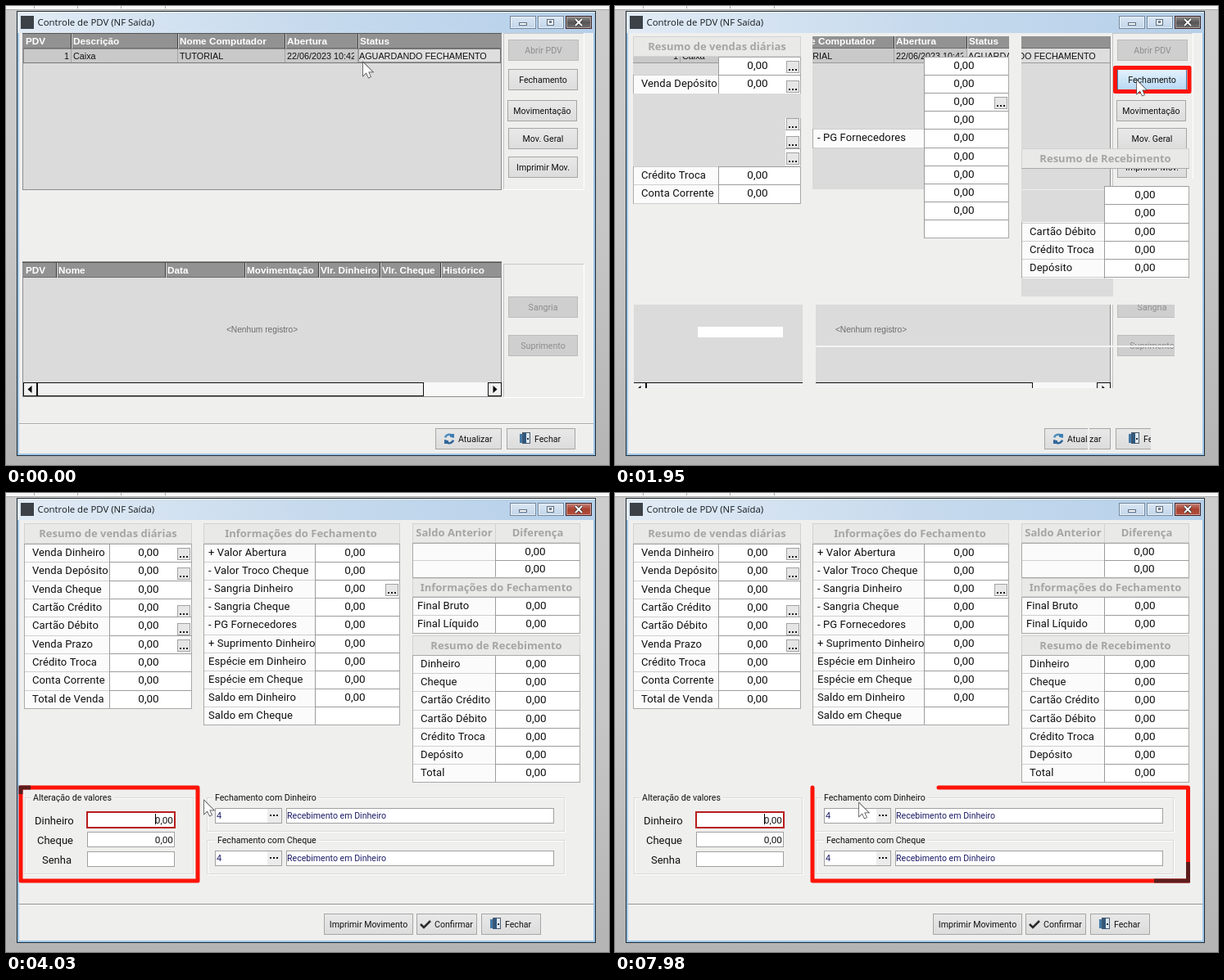
Write an HTML page with a canvas that moves like this. It is 736 by 561 pixels and loops after 8 s.

```html
<!DOCTYPE html>
<html lang="pt">
<head>
<meta charset="utf-8">
<title>Controle de PDV</title>
<style>
html, body { margin: 0; width: 100%; height: 100%; overflow: hidden; background: #c4c4c4; }
canvas { display: block; }
</style>
</head>
<body>
<canvas id="stage" width="736" height="561"></canvas>
<script>
const g = document.getElementById('stage').getContext('2d');
const LOOP = 8000;
const UI = 'Roboto, sans-serif', GRID = '"Liberation Sans", Arial, sans-serif';
const HEAD = '"Noto Sans", sans-serif', CAPTION = '"Open Sans", sans-serif';
const FACE = '#efefee', RED = '#fd1409', DARK = '#5c1c1c';

function rect(x, y, w, h, fill) {
  g.fillStyle = fill;
  g.fillRect(x, y, w, h);
}
function frame(x, y, w, h, color, width = 1) {
  g.strokeStyle = color;
  g.lineWidth = width;
  g.strokeRect(x + width / 2, y + width / 2, w - width, h - width);
}
function box(x, y, w, h, fill, border) {
  rect(x, y, w, h, fill);
  frame(x, y, w, h, border);
}
function text(s, x, cy, size, color = '#111', align = 'left', family = UI, weight = 400) {
  g.font = `${weight} ${size}px ${family}`;
  g.textAlign = align;
  g.fillStyle = color;
  g.fillText(s, x, Math.round(cy + size * 0.34));
}
function path(points, color, width = 1, close = false) {
  g.beginPath();
  points.forEach(([x, y], i) => i ? g.lineTo(x, y) : g.moveTo(x, y));
  if (close) g.closePath();
  g.strokeStyle = color;
  g.lineWidth = width;
  g.stroke();
}
function shade(x0, y0, x1, y1, ...colors) {
  const s = g.createLinearGradient(x0, y0, x1, y1);
  colors.forEach((c, i) => s.addColorStop(i / (colors.length - 1), c));
  return s;
}
function clipTo(rects, draw) {
  g.save();
  g.beginPath();
  rects.forEach(r => g.rect(...r));
  g.clip();
  draw();
  g.restore();
}

// ---- shared widgets ----
function button(label, x, y, w, state = '', textX = x + w / 2, align = 'center') {
  const off = state === 'off', hot = state === 'hot';
  const fill = off ? '#cfcfcf' : hot ? shade(0, y, 0, y + 26, '#e6f2fc', '#b5d8f5') : shade(0, y, 0, y + 26, '#e9e9e9', '#dcdcdc');
  box(x, y, w, 26, fill, off ? '#bcbcbc' : hot ? '#3f7fb0' : '#a6a6a6');
  text(label, textX, y + 13, 10.6, off ? '#8d8d8d' : '#111', align);
}
function refreshIcon(x, y) {
  g.lineWidth = 2.6;
  for (const a of [0.3, 0.3 + Math.PI]) {
    g.beginPath();
    g.arc(x, y, 5.2, a, a + 2.6);
    g.strokeStyle = a < 1 ? '#2f6699' : '#4d8dbd';
    g.stroke();
  }
  rect(x + 1, y - 6, 5, 4, '#3d7fb4');
  rect(x - 6, y + 2, 5, 4, '#2f6699');
}
function doorIcon(x, y) {
  box(x + 3, y, 10, 14, '#dfe9f2', '#4a5a6c');
  rect(x + 4, y + 1, 4, 13, '#31577c');
  rect(x, y + 2, 3, 11, '#4379a8');
  rect(x + 9, y + 7, 2, 2, '#1f2c38');
}
function checkIcon(x, y) {
  path([[x, y + 4], [x + 4, y + 8], [x + 12, y]], '#2a2a2a', 2.6);
}
function closeButton(label, x, y, w) {
  const inset = w < 80 ? 11 : 16;
  button(label, x, y, w, '', x + inset + 18, 'left');
  doorIcon(x + inset, y + 5);
}
function dots(x, cy) {
  box(x - 8, cy - 8, 16, 15, '#e6e6e6', '#a2a2a2');
  for (let i = -1; i < 2; i++) rect(x + i * 4 - 1, cy + 2, 2, 2, '#222');
}

// ---- window chrome ----
function chrome(redClose) {
  rect(0, 0, 736, 561, shade(0, 0, 0, 561, '#cdcdcd', '#c6c6c6', '#b4b4b4'));
  rect(0, 0, 736, 4, '#f8f8f8');
  rect(0, 4, 736, 1, '#a9aaa9');
  for (const x of [34, 87, 140, 194]) rect(x, 0, 1, 3, '#a7aca7');
  rect(13, 6, 707, 544, '#1d2a36');
  rect(14, 7, 705, 542, '#9fc6e6');
  rect(14, 7, 705, 26, shade(14, 0, 719, 0, '#e1ebf5', '#c7daed', '#b5d0ea'));
  rect(14, 7, 705, 1, '#f2f7fb');
  rect(16, 33, 701, 514, FACE);
  rect(18, 12, 16, 16, '#3c4148');
  text('Controle de PDV (NF Saída)', 38.5, 20, 11.4, '#15191e', 'left', CAPTION);
  for (const x of [615, 649]) {
    box(x, 12, 32, 16, shade(0, 12, 0, 28, '#dde8f4', '#bfd4e9'), '#74879b');
    frame(x + 1, 13, 30, 14, '#e8f0f8');
  }
  box(626, 20, 10, 4, '#fff', '#5a6b7d');
  box(660, 16, 9, 8, '#fff', '#5a6b7d');
  box(663, 18, 3, 3, '#a9bdd0', '#5a6b7d');
  const fill = redClose ? shade(0, 12, 0, 28, '#c88a80', '#a8402f', '#b5523f') : shade(0, 12, 0, 28, '#9b9898', '#575455', '#777273');
  box(683, 12, 32, 16, fill, '#422529');
  frame(684, 13, 30, 14, redClose ? '#d0a49c' : '#aaa7a7');
  for (const [c, w] of [['#303030', 3.6], ['#fff', 2]]) {
    path([[695, 16], [703, 24]], c, w);
    path([[703, 16], [695, 24]], c, w);
  }
}

// ---- first screen: registers and movements ----
function gridHead(y, cols, names) {
  rect(21, y, 583, 18, '#929292');
  rect(20, y - 1, 585, 1, '#555');
  rect(21, y + 17, 583, 1, '#6c6c6c');
  cols.forEach((x, i) => {
    if (i) {
      rect(x - 3, y, 1, 18, '#3c3c3c');
      rect(x - 2, y, 1, 18, '#d5d5d5');
    }
    text(names[i], x, y + 9, 11.75, '#fff', 'left', GRID, 700);
  });
}
function panel(y, h) {
  rect(607, y, 98, 1, '#c6c6c6');
  rect(607, y, 1, h, '#c6c6c6');
  rect(607, y + h, 99, 1, '#fff');
  rect(705, y, 1, h, '#fff');
}
function listScreen(hot, focus) {
  rect(16, 33, 701, 514, FACE);
  box(20, 33, 585, 192, '#dbdbdb', '#8d8d8d');
  const cols = [24, 82, 212, 343, 432];
  gridHead(34, cols, ['PDV', 'Descrição', 'Nome Computador', 'Abertura', 'Status']);
  rect(21, 52, 409, 17, '#c9c9c9');
  rect(430, 52, 174, 17, '#dedede');
  cols.slice(1).forEach(x => rect(x - 3, 52, 1, 17, '#a4a4a4'));
  rect(21, 69, 583, 1, '#999');
  const cell = (s, x, align) => text(s, x, 61, 10.8, '#111', align, GRID);
  cell('1', 77, 'right');
  cell('Caixa', 82);
  cell('TUTORIAL', 212);
  clipTo([[341, 52, 84, 17]], () => cell('22/06/2023 10:42', 343));
  cell('AGUARDANDO FECHAMENTO', 431);
  if (focus) {
    g.setLineDash([1, 1]);
    frame(21, 52, 583, 18, '#555');
    frame(430, 52, 174, 17, '#555');
    g.setLineDash([]);
  }
  panel(33, 191);
  button('Abrir PDV', 613, 41, 86, 'off');
  button('Fechamento', 613, 77, 85, hot ? 'hot' : '');
  button('Movimentação', 612, 115, 85);
  button('Mov. Geral', 613, 149, 85);
  button('Imprimir Mov.', 613, 184, 85);

  box(20, 312, 585, 166, '#dbdbdb', '#8d8d8d');
  gridHead(314, [24, 64, 197, 294, 384, 459, 533],
    ['PDV', 'Nome', 'Data', 'Movimentação', 'Vlr. Dinheiro', 'Vlr. Cheque', 'Histórico']);
  text('<Nenhum registro>', 312.5, 396, 10.2, '#6d6d6d', 'center', GRID);
  rect(21, 460, 583, 17, '#f8f8f8');
  box(38, 460, 472, 17, '#f0f0f0', '#111');
  for (const [x, d] of [[21, -1], [588, 1]]) {
    box(x, 460, 17, 17, '#f2f2f2', '#111');
    g.fillStyle = '#000';
    g.beginPath();
    g.moveTo(x + 8.5 + 3 * d, 468.5);
    g.lineTo(x + 8.5 - 2 * d, 464);
    g.lineTo(x + 8.5 - 2 * d, 473);
    g.fill();
  }
  panel(315, 163);
  button('Sangria', 613, 355, 85, 'off');
  button('Suprimento', 613, 402, 85, 'off');
  rect(16, 510, 701, 1, '#a9a9a9');
  rect(16, 511, 701, 1, '#fff');
  button('Atualizar', 524, 516, 81, '', 552, 'left');
  refreshIcon(541, 529);
  closeButton('Fechar', 611, 516, 84);
}

// ---- second screen: closing form ----
function heading(label, x, y, w, h, cx = x + w / 2) {
  box(x, y, w, h, '#e9e9e8', '#d2d2d2');
  text(label, cx, y + h / 2, 13, '#a5a5a5', 'center', HEAD, 700);
}
function rows(x, y, w, split, pitch, labels, labelX, valueX, empty = -1) {
  const h = pitch * labels.length;
  rect(x, y, split - x, h, '#fbfbfb');
  rect(split, y, x + w - split, h, '#fff');
  labels.forEach((label, i) => {
    const top = Math.round(y + i * pitch);
    rect(x, top, split - x, 1, '#cfcfcf');
    rect(split, top, x + w - split, 1, '#9c9c9c');
    g.letterSpacing = '0.1px';
    text(label, labelX, top + 11, 13);
    g.letterSpacing = '0px';
    if (i !== empty) text('0,00', valueX, top + 10.2, 13.5, '#111', 'center');
  });
  frame(x, y, w, Math.round(h) + 1, '#a9a9a9');
  rect(split, y, 1, h, '#9c9c9c');
}
function group(label, x, y, w, h, labelX) {
  frame(x + 1, y + 1, w, h, '#fff');
  frame(x, y, w, h, '#d9d9d9');
  g.font = `10.6px ${UI}`;
  rect(labelX - 3, y - 3, g.measureText(label).width + 6, 6, FACE);
  text(label, labelX, y, 10.6);
}
function account(label, y, labelX) {
  group(label, 245, y, 437, 42, labelX);
  box(255, y + 13, 82, 19, '#fff', '#a0a0a0');
  text('4', 257, y + 22, 10.8, '#1c1c68');
  rect(319, y + 14, 17, 17, '#ececec');
  for (let i = 0; i < 3; i++) rect(322 + i * 4, y + 21, 2, 2, '#111');
  box(342, y + 13, 327, 19, '#fff', '#a0a0a0');
  text('Recebimento em Dinheiro', 343, y + 22, 10.6, '#1c1c68');
}
function formScreen() {
  rect(16, 33, 701, 514, FACE);
  heading('Resumo de vendas diárias', 22, 37, 205, 25);
  rows(22, 62, 205, 126, 22.35, ['Venda Dinheiro', 'Venda Depósito', 'Venda Cheque', 'Cartão Crédito',
    'Cartão Débito', 'Venda Prazo', 'Crédito Troca', 'Conta Corrente', 'Total de Venda'], 32, 174);
  for (const y of [75, 99, 145, 167, 187]) dots(217, y);

  heading('Informações do Fechamento', 241, 37, 240, 25, 360);
  rows(241, 62, 240, 377, 22.1, ['+ Valor Abertura', '- Valor Troco Cheque', '- Sangria Dinheiro',
    '- Sangria Cheque', '- PG Fornecedores', '+ Suprimento Dinheiro', 'Espécie em Dinheiro',
    'Espécie em Cheque', 'Saldo em Dinheiro', 'Saldo em Cheque'], 247, 426, 9);
  dots(471, 119);

  heading('Saldo Anterior', 496, 37, 102, 24);
  heading('Diferença', 597, 37, 104, 24);
  rows(496, 61, 205, 597, 20.8, ['', ''], 502, 646);
  heading('Informações do Fechamento', 496, 104, 205, 23);
  rows(496, 127, 205, 597, 22, ['Final Bruto', 'Final Líquido'], 502, 647);
  heading('Resumo de Recebimento', 496, 174, 205, 25);
  rows(496, 198, 205, 597, 22.2, ['Dinheiro', 'Cheque', 'Cartão Crédito', 'Cartão Débito',
    'Crédito Troca', 'Depósito', 'Total'], 506, 647);

  group('Alteração de valores', 23, 372, 206, 94, 33);
  text('Dinheiro', 35, 400.5, 13);
  text('Cheque', 38, 424.5, 13);
  text('Senha', 44, 448.5, 13);
  rect(98, 389, 109, 21, '#fff');
  frame(98, 389, 109, 21, '#b71c1c', 2);
  box(99, 414, 107, 19, '#fff', '#a0a0a0');
  box(99, 438, 107, 19, '#fff', '#a0a0a0');
  text('0,00', 204, 399.5, 11.8, '#111', 'right');
  text('0,00', 204, 423.5, 11.8, '#111', 'right');
  rect(182, 392, 1, 13, '#000');
  account('Fechamento com Dinheiro', 372, 255);
  account('Fechamento com Cheque', 424, 258);

  rect(16, 502, 701, 1, '#8f8f8f');
  rect(16, 503, 701, 1, '#fff');
  button('Imprimir Movimento', 388, 514, 109);
  button('Confirmar', 501, 514, 74, '', 523, 'left');
  checkIcon(506, 523);
  closeButton('Fechar', 580, 514, 73);
}

// ---- piecewise repaint between the screens ----
const STALE = [[22, 37, 205, 187], [241, 37, 240, 187], [496, 37, 112, 187], [605, 33, 112, 178],
  [23, 365, 206, 102], [245, 365, 363, 102], [613, 365, 70, 64], [520, 513, 57, 29], [579, 513, 75, 29]];
const FRESH = [[22, 37, 205, 25], [126, 62, 102, 23], [22, 84, 206, 23], [208, 137, 19, 58],
  [22, 196, 206, 46], [377, 62, 105, 223], [241, 150, 136, 24], [496, 174, 206, 25],
  [597, 220, 105, 113], [496, 264, 102, 69]];
const LATE = [[22, 37, 206, 230], [241, 37, 241, 250], [496, 37, 206, 320], [16, 360, 701, 187]];
function repaint(t) {
  const step = Math.floor((t - 1740) / 70);
  rect(16, 33, 701, 514, FACE);
  clipTo(STALE, () => listScreen(true, false));
  rect(496, 225, 112, 130, '#dbdbdb');
  rect(245, 415, 437, 2, '#f4f4f4');
  rect(101, 392, 104, 13, '#fff');
  const ready = FRESH.slice(0, 1 + step * 3).concat(LATE.slice(0, Math.max(0, step - 3) * 2));
  clipTo(ready, formScreen);
}

// ---- overlays ----
// Outline that grows from the top left corner, going down first.
function outline(t, start, x0, y0, x1, y1) {
  const p = Math.min(1, (t - start) / 394);
  if (p <= 0) return;
  const length = 2 * (x1 - x0 + y1 - y0);
  g.lineJoin = g.lineCap = 'round';
  g.setLineDash(p < 1 ? [p * length, length] : []);
  path([[x0, y0], [x0, y1], [x1, y1], [x1, y0]], RED, 5, true);
  g.setLineDash([]);
  g.lineJoin = 'miter';
  g.lineCap = 'butt';
}
const CURSOR = [[0, 0], [0, 16], [3.8, 12.4], [6.6, 18.5], [9, 17.4], [6.3, 11.5], [11.5, 11.5]];
function cursor(x, y) {
  g.save();
  g.translate(x, y);
  path(CURSOR, '#3f3f3f', 1.4, true);
  g.fillStyle = '#fff';
  g.fill();
  g.restore();
}
const MOVES = [[70, 840, 637, 91], [2560, 2830, 242, 376], [6230, 6300, 241, 376], [6300, 6720, 298, 379]];
function cursorAt(t) {
  let x = 436, y = 69;
  for (const [a, b, tx, ty] of MOVES) {
    const p = Math.max(0, Math.min(1, (t - a) / (b - a)));
    const e = p * p * (3 - 2 * p);
    x += (tx - x) * e;
    y += (ty - y) * e;
  }
  return [x, y];
}

function draw(t) {
  const [cx, cy] = cursorAt(t);
  chrome(t >= 2560);
  if (t < 1740) listScreen(cx > 613 && cy > 77, t < 840);
  else if (t < 2160) repaint(t);
  else formScreen();

  if (t < 2160) outline(t, 900, 610.5, 75.5, 701, 104.5);
  if (t < 6980) outline(t, 3380, 18, 360, 234, 474);
  if (t >= 3390 && t < 4970) path([[18, 368], [18, 360], [30, 360]], DARK, 5);
  outline(t, 7640, 241, 360, 699.5, 474);
  if (t >= 7840) path([[658, 474], [699.5, 474], [699.5, 451]], DARK, 5);
  cursor(cx, cy);
}
function tick() {
  draw(performance.now() % LOOP);
  requestAnimationFrame(tick);
}
tick();
</script>
</body>
</html>
```
